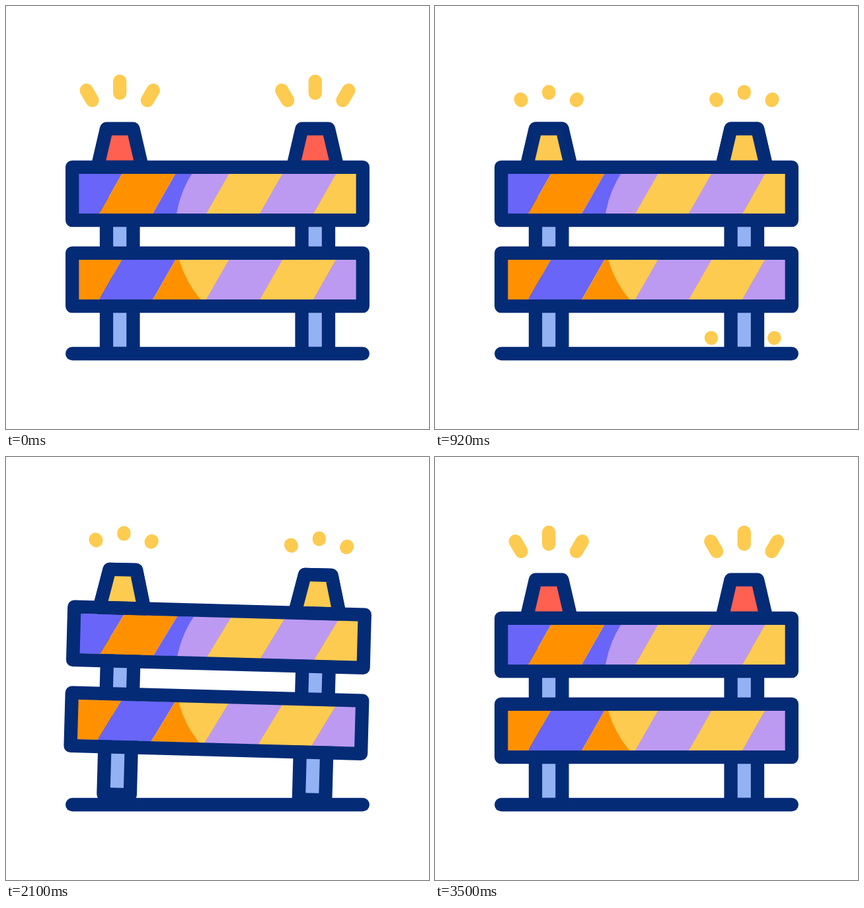
Write an HTML page with a canvas that moves like this. It is 640 px wide and 640 px high and loops after 3600 ms.

```html
<!DOCTYPE html>
<html lang="en">
<head>
<meta charset="utf-8">
<title>Road barrier</title>
<style>
  html, body { margin: 0; width: 100%; height: 100%; overflow: hidden; background: #fff; }
  canvas { display: block; }
</style>
</head>
<body>
<canvas id="stage" width="640" height="640"></canvas>
<script>
const ctx = document.getElementById('stage').getContext('2d');
const NAVY = '#042b76', STEEL = '#93b2f4', YELLOW = '#fdcb50', RED = '#ff6050';
const DARK = ['#6865f8', '#ff9100'], LIGHT = ['#bc9af2', YELLOW];
const SPAN = 295.6, RAIL_HEIGHT = 80.4;

const mix = (a, b, k) => a + (b - a) * k;
const curve = (a, b, c, u) => mix(mix(a, b, u), mix(b, c, u), u);

function ease(x) {
  x = Math.min(1, Math.max(0, x));
  return x * x * (3 - 2 * x);
}

function fillShape(points, color) {
  ctx.beginPath();
  points.forEach(p => ctx.lineTo(...p));
  ctx.closePath();
  ctx.fillStyle = color;
  ctx.fill();
}

function outlined(points, color) {
  fillShape(points, color);
  ctx.strokeStyle = NAVY;
  ctx.stroke();
}

function line(points, color) {
  ctx.beginPath();
  points.forEach(p => ctx.lineTo(...p));
  ctx.strokeStyle = color;
  ctx.stroke();
}

// Trapezoid, symmetric about x; a box when both half widths are equal
const block = (x, top, bottom, half, foot = half) =>
  [[x - half, top], [x + half, top], [x + foot, bottom], [x - foot, bottom]];

function stripes(top, colors, first) {
  for (let i = 0; i < 6; i++) {
    const x = 94.5 + 81 * i;
    fillShape([[x, top], [x + 81, top], [x + 46.5, top + 60.4], [x - 34.5, top + 60.4]],
      colors[(first + i) % 2]);
  }
}

function rail(top, first) {
  ctx.save();
  ctx.beginPath();
  ctx.rect(105, top, 430, RAIL_HEIGHT);
  ctx.clip();
  stripes(top + 10, DARK, first);
  ctx.beginPath();
  ctx.arc(416, 340, 160, 0, 2 * Math.PI);
  ctx.clip();
  stripes(top + 10, LIGHT, first);
  ctx.restore();
  outlined(block(320, top, top + RAIL_HEIGHT, 219.8), 'transparent');
}

function lamp(x, glow, rayLength) {
  const shape = block(x, 185.6, 244, 20.2, 33.8);
  outlined(shape, RED);
  ctx.globalAlpha = glow;
  outlined(shape, YELLOW);
  ctx.globalAlpha = 1;

  const k = mix(0.11, 1, rayLength);
  line([[x, 131.8], [x, 131.8 - 17.8 * k]], YELLOW);
  for (const side of [-1, 1])
    line([[x + side * 41.6, 142.8], [x + side * (41.6 + 9 * k), 142.8 - 15.3 * k]], YELLOW);
}

// Two curved puffs flying off the foot that has just landed
function dust(x, age) {
  if (age <= 0 || age >= 30) return;
  const tail = ease((age - 15) / 15), head = ease(age / 15);
  for (const side of [-1, 1]) {
    const points = [];
    for (let i = 0; i <= 12; i++) {
      const u = mix(tail, head, i / 12);
      points.push([x + side * curve(47.5, 62, 88.7, u), curve(502.5, 479, 475.8, u)]);
    }
    line(points, YELLOW);
  }
}

const hop = (age, fall) => ease(age / 30) * (1 - ease((age - 30) / fall));

// One tick is 20 ms: a hop to each side, then a sway until the barrier rests
function draw(tick) {
  const hopLeft = hop(tick, 15), hopRight = hop(tick - 60, 20);
  const swing = (tick - 112.5) / 15;
  const sway = swing > 0 && swing < 4 ? 2.9 * Math.sin(Math.PI * swing) : 0;
  const tilt = 10 * (hopRight - hopLeft) + sway;

  // The last flash is quicker, so that it ends at tick 175
  const beat = Math.min(180, tick + Math.max(0, tick - 165) / 2);
  const rayLength = (1 + Math.cos(Math.PI * beat / 15)) / 2;
  const glow = ease((22.5 - Math.abs(beat % 60 - 37.5)) / 15);

  ctx.fillStyle = '#fff';
  ctx.fillRect(0, 0, 640, 640);
  ctx.lineWidth = 20.3;
  ctx.lineCap = ctx.lineJoin = 'round';

  ctx.save();
  ctx.beginPath();
  ctx.rect(0, 0, 640, 526);
  ctx.clip();
  ctx.translate(320, 355.5 - 72 * (hopLeft + hopRight));
  ctx.rotate(tilt * Math.PI / 180);
  ctx.translate(-320, -355.5);
  for (const x of [172.2, 172.2 + SPAN]) {
    outlined(block(x, 300, 526, 20.2), STEEL);
    lamp(x, glow, rayLength);
  }
  rail(243.8, 0);
  rail(373.8, 1);
  ctx.restore();

  line([[100.2, 526], [539.8, 526]], NAVY);
  dust(465.7, tick - 45);
  dust(169.2, tick - 110);
}

function loop() {
  draw(Math.floor(performance.now() % 3600 / 20));
  requestAnimationFrame(loop);
}
loop();
</script>
</body>
</html>
```
